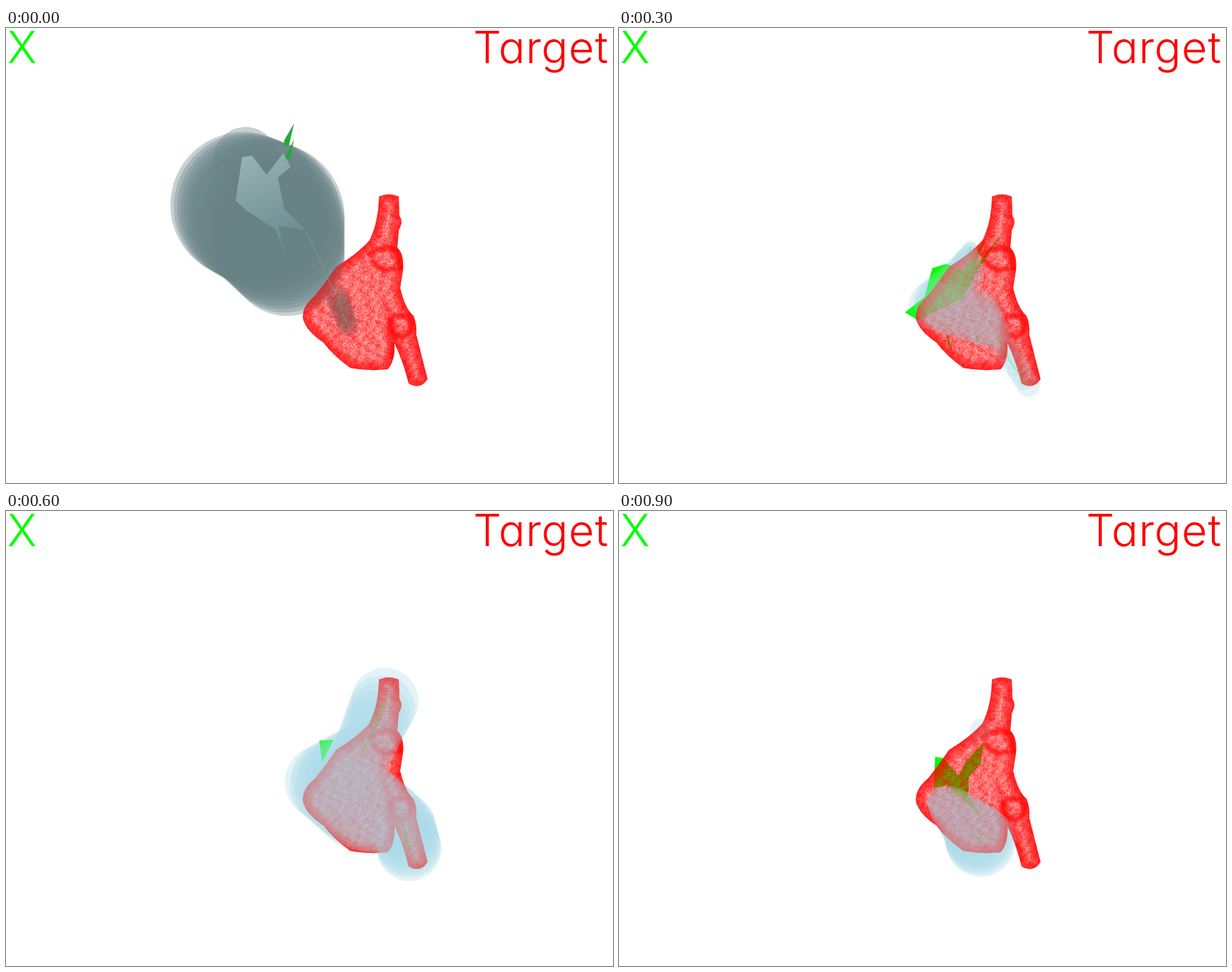
These frames come from a looping animation (864x648 px, 1 s). An HTML page with a canvas:

```html
<!DOCTYPE html>
<html lang="en">
<head>
<meta charset="utf-8">
<title>Shape fitting</title>
<style>
html, body { margin: 0; width: 100%; height: 100%; overflow: hidden; background: #fff; }
canvas, svg { position: absolute; left: 0; top: 0; }
text { font: 350 63px Inter, Lato, sans-serif; font-feature-settings: "cv11"; letter-spacing: .8px; }
</style>
</head>
<body>
<canvas id="stage" width="864" height="648"></canvas>
<svg width="864" height="648">
  <text x="2" y="50" fill="#0f0">X</text>
  <text x="665" y="50" fill="#f00">Target</text>
</svg>
<script>
const W = 864, H = 648, STEPS = 7;
const stage = document.getElementById('stage').getContext('2d');

function layer() {
  const c = document.createElement('canvas');
  c.width = W;
  c.height = H;
  return c.getContext('2d');
}

let seed = 7;
function rand() {
  seed = (seed * 16807) % 2147483647;
  return seed / 2147483647;
}

const outline = new Path2D(`M531 240Q545 234 559 240L560 268Q566 275 559 288L557 313
  Q567 322 565 345L561 370Q568 400 580 410Q585 420 584 437L600 500Q590 516 573 506
  Q567 480 553 448Q554 475 543 486Q515 489 490 484Q465 466 452 448Q428 432 423 415
  Q420 397 440 381Q455 362 470 340Q500 322 517 303Q530 278 531 240Z`);
const folds = new Path2D(`M515 325Q538 306 556 318L563 345M521 330Q532 350 555 342
  M553 410a15 16 0 1 0 18 0ZM553 448L549 472`);

// Red point cloud: woven dots, denser towards the rim and the folds
function makeCloud() {
  const g = layer();
  g.fillStyle = g.strokeStyle = '#f00';
  g.clip(outline);
  for (let y = 234; y < 514; y += 2)
    for (let x = 420; x < 604; x += 2) {
      const wave = Math.sin(x * .35 + Math.sin(y * .13) * 2) * Math.sin(y * .28 + x * .09);
      g.globalAlpha = .57 + wave * .1 + (rand() - .5) * .3;
      g.fillRect(x, y, 2, 2);
    }
  g.globalAlpha = .2;
  for (let w = 4; w < 34; w += 6) {
    g.lineWidth = w;
    g.stroke(outline);
    g.lineWidth = w / 2.5;
    g.stroke(folds);
  }
  return g.canvas;
}
const cloud = makeCloud();

const mix = (a, b, k) => a.map((v, j) => v + (b[j] - v) * k);

// Sweeps translucent discs [x, y, r] along a spine; a zero radius breaks the sweep
function makeBlob(spine, rgb, alpha) {
  const g = layer();
  g.fillStyle = `rgba(${rgb},${alpha})`;
  spine.forEach((a, i) => {
    const b = spine[i + 1];
    const n = b && a[2] && b[2] ? STEPS : 1;
    for (let k = 0; k < n; k++) {
      const [x, y, r] = k ? mix(a, b, k / n) : a;
      g.beginPath();
      g.arc(x, y, r, 0, 7);
      g.fill();
    }
  });
  return g.canvas;
}

// Blob behind the cloud, veil of the same blob in front, green medial sheet and seams
function draw({ spine, sheet = '', veil, alpha = .22, rgb = '173,216,230', over }) {
  const g = layer();
  const blob = makeBlob(spine, rgb, alpha);
  g.fillStyle = '#fff';
  g.fillRect(0, 0, W, H);
  g.drawImage(blob, 0, 0);
  g.fillStyle = g.strokeStyle = '#0f0';
  g.fill(new Path2D(sheet));
  g.drawImage(cloud, 0, 0);
  g.globalAlpha = veil;
  g.drawImage(blob, 0, 0);
  g.globalAlpha = .6;
  for (const [a, b] of [spine.slice(0, 2), spine.slice(-2)]) {
    if (!a[2] || !b[2]) continue;
    g.beginPath();
    g.moveTo(a[0], a[1]);
    g.quadraticCurveTo(a[0] + (b[0] - a[0]) * .3, (a[1] + b[1]) / 2, b[0], b[1]);
    g.stroke();
  }
  g.globalAlpha = 1;
  if (over) over(g);
  return g.canvas;
}

function between(a, b) {
  return { ...b, spine: a.spine.map((d, i) => mix(d, b.spine[i], .5)), veil: (a.veil + b.veil) / 2 };
}

function sheetAndLeaves(g) {
  const shade = g.createLinearGradient(340, 180, 400, 320);
  shade.addColorStop(0, '#96b4b6');
  shade.addColorStop(1, '#68878a');
  g.fillStyle = shade;
  g.fill(new Path2D(`M336 184L350 182L371 209L395 178L405 198L387 213L396 258L427 288
    L388 282L399 329L384 287L345 262L327 246Z`));
  g.strokeStyle = '#789b98';
  g.stroke(new Path2D('M427 288L466 374'));
  g.fillStyle = '#22aa35';
  g.fill(new Path2D('M410 136L396 160L396 169L403 166ZM410 158L397 186L404 187Z'));
}

const dark = {
  spine: [[341, 187, 46], [341, 187, 0], [338, 252, 104], [375, 270, 107], [400, 328, 82],
    [400, 328, 0], [472, 383, 17], [487, 425, 14]],
  rgb: '104,131,135', alpha: .28, veil: .45, over: sheetAndLeaves
};
const wide = {
  spine: [[630, 230, 40], [620, 292, 60], [557, 368, 110], [590, 400, 78], [650, 445, 40], [675, 511, 27]],
  alpha: .3, veil: .72
};
const left = {
  spine: [[458, 328, 11], [492, 342, 26], [440, 388, 42], [492, 395, 56], [545, 420, 15], [605, 516, 12]],
  sheet: 'M457 331L475 327L476 344L454 366ZM540 262L508 317L521 315ZM540 298L510 343L530 334Z',
  veil: .58
};
const pointed = {
  spine: [[543, 296, 8], [490, 362, 32], [455, 402, 28], [520, 425, 22], [532, 455, 24], [560, 502, 21]],
  sheet: `M407 405L435 383L446 342L466 336L492 345L523 297L506 341L545 293L508 350L490 385L425 416Z
    M466 432L475 461L468 450ZM505 425L514 450L509 446Z`,
  veil: .6
};
const full = {
  spine: [[548, 278, 52], [531, 340, 53], [460, 392, 70], [513, 446, 63], [580, 462, 52], [591, 494, 48]],
  alpha: .3, veil: .71
};
const neck = {
  spine: [[530, 265, 44], [485, 345, 32], [440, 380, 36], [500, 395, 65], [552, 433, 38], [557, 468, 44]],
  sheet: 'M446 327L466 326L450 357ZM532 264L515 309L501 330L529 291Z',
  veil: .66
};
const bottom = {
  spine: [[515, 311, 15], [519, 325, 0], [456, 412, 18], [474, 424, 32], [505, 455, 43], [515, 471, 50]],
  sheet: `M450 350L462 352L483 377L495 355L519 329L515 360L498 378L497 406L515 435L466 390L448 395Z
    M557 460L577 488L570 482Z`,
  veil: .57
};

const poses = [dark, wide, left, between(left, pointed), pointed, full,
  between(full, neck), neck, between(neck, bottom), bottom].map(draw);
let shown = -1;

function tick() {
  const i = Math.floor(performance.now() % 1000 / 100);
  if (i !== shown) stage.drawImage(poses[shown = i], 0, 0);
  requestAnimationFrame(tick);
}
tick();
</script>
</body>
</html>
```
